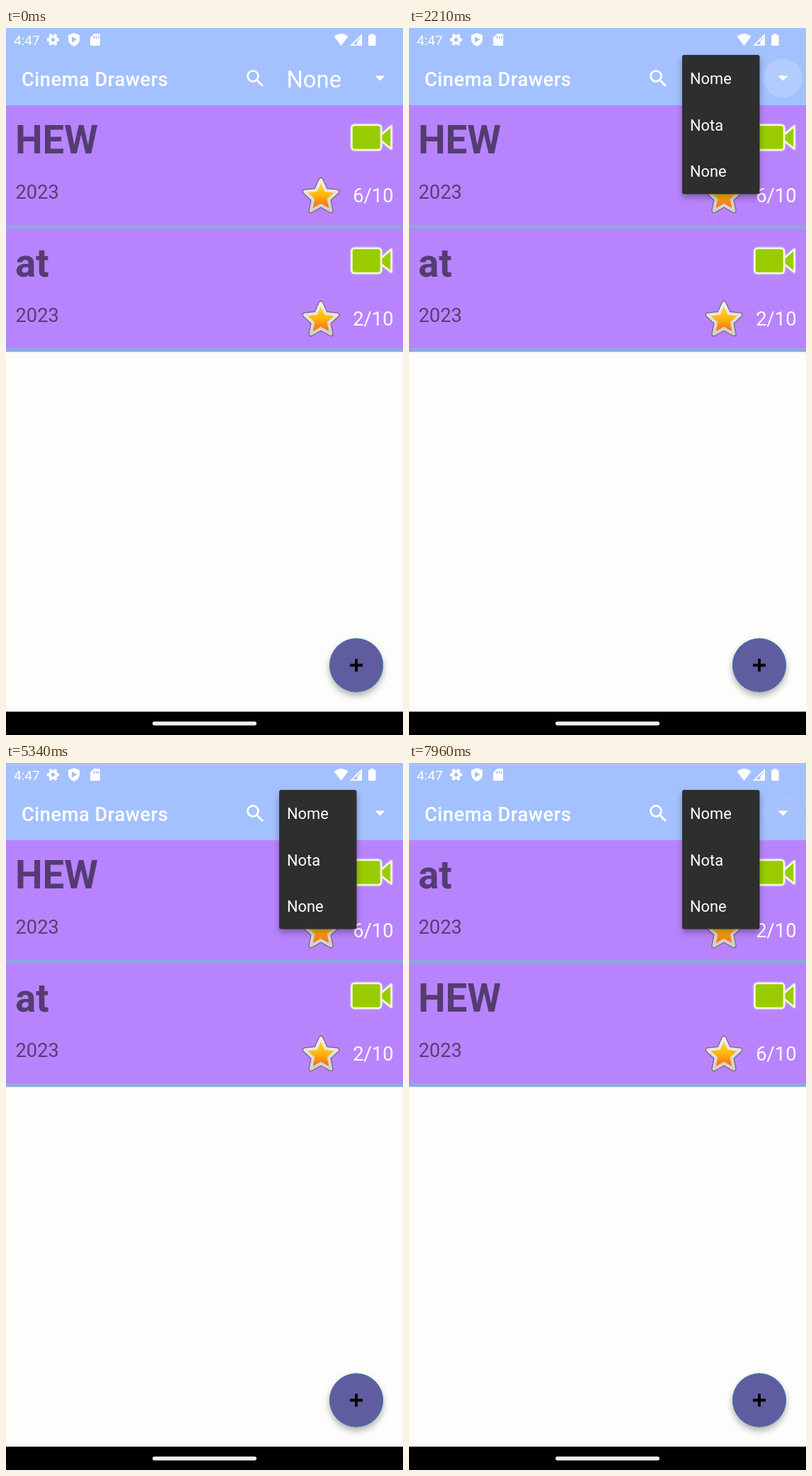
An HTML page that plays this animation: 561 by 998 pixels, repeating every 8000 ms.

```html
<!DOCTYPE html>
<html lang="en">
<head>
<meta charset="utf-8">
<title>Film list</title>
<style>
  html, body { margin: 0; width: 100%; height: 100%; overflow: hidden; background: #fdfdfb; }
  svg { display: block; width: 100%; height: 100%; }
  text { font-family: Roboto, sans-serif; font-size: 27.3px; fill: #fff; }
  .name { font-size: 54.6px; font-weight: 700; fill: #543c73; }
  .year { fill: #563e76; }
  .heading { font-weight: 500; letter-spacing: .5px; }
  .choice { font-size: 32.75px; }
  .clock { font-size: 19.1px; }
  #menu text { font-size: 21.84px; }
</style>
</head>
<body>
<svg viewBox="0 0 561 998">
  <defs>
    <linearGradient id="gold" x1="0" y1="0" x2="0" y2="1">
      <stop offset=".1" stop-color="#ffd21c"/>
      <stop offset=".5" stop-color="#ffb40c"/>
      <stop offset="1" stop-color="#fb6a14"/>
    </linearGradient>
    <linearGradient id="silver" x1="0" y1="0" x2="0" y2="1">
      <stop offset="0" stop-color="#f2f0ee"/>
      <stop offset="1" stop-color="#d2cdd4"/>
    </linearGradient>
    <filter id="shadow" x="-30%" y="-30%" width="160%" height="170%">
      <feDropShadow dx="0" dy="5" stdDeviation="5" flood-opacity=".3"/>
    </filter>
    <filter id="glow" x="-20%" y="-20%" width="140%" height="140%">
      <feDropShadow dx="0" dy="0" stdDeviation="1.2" flood-color="#fff" flood-opacity=".8"/>
    </filter>
    <g id="camera" stroke="#f1f8d8" stroke-width="2.6" stroke-linejoin="round" fill="#99cc00" filter="url(#glow)">
      <path d="M530 151L544.5 138.5V170.5L530 159Z"/>
      <rect x="488.5" y="137" width="41.5" height="35" rx="4"/>
    </g>
    <g id="star" stroke-linejoin="round">
      <path class="star" fill="#77656f" stroke="#77656f" stroke-width="7"/>
      <path class="star" fill="url(#silver)" stroke="url(#silver)" stroke-width="4.5"/>
      <path class="star" fill="url(#gold)" transform="scale(.8)"/>
    </g>
  </defs>

  <rect width="561" height="998" fill="#fdfdfb"/>
  <rect width="561" height="109" fill="#a3c1fe"/>

  <!-- status bar -->
  <text class="clock" x="11" y="24">4:47</text>
  <g fill="none" stroke="#fff">
    <circle cx="66.5" cy="16.5" r="4.7" stroke-width="3.8"/>
    <circle cx="66.5" cy="16.5" r="7.2" stroke-width="3" pathLength="60" stroke-dasharray="5" stroke-dashoffset="2.5"/>
  </g>
  <g fill="#fff">
    <path fill-rule="evenodd" d="M96 7L104 10V16Q104 22.5 96 26Q88 22.5 88 16V10ZM93 12V20.5L100.5 16.2Z"/>
    <path fill-rule="evenodd" d="M124.5 8H131.5Q133 8 133 9.5V23.5Q133 25 131.5 25H120.5Q119 25 119 23.5V13.5ZM123.5 11.5V15H125.2V11.5ZM126.7 11.5V15H128.4V11.5ZM129.9 11.5V15H131.6V11.5Z"/>
    <path d="M463.5 12Q473.5 4 483.5 12L473.5 25Z"/>
    <path fill-rule="evenodd" d="M503 8V25H486ZM501.3 12.2L490.2 23.3H496.5V18.5L501.3 13.7Z"/>
    <path d="M515 8H519.5V9.7H521Q522.5 9.7 522.5 11V23.7Q522.5 25 521 25H513.5Q512 25 512 23.7V11Q512 9.7 513.5 9.7H515Z"/>
  </g>

  <!-- app bar -->
  <text class="heading" x="22" y="81.5">Cinema Drawers</text>
  <path transform="translate(336 55) scale(1.365)" fill="#fff" d="M15.5 14h-.79l-.28-.27A6.47 6.47 0 0 0 16 9.5 6.5 6.5 0 1 0 9.5 16c1.61 0 3.09-.59 4.23-1.57l.27.28v.79l5 4.99L20.49 19l-4.99-5zm-6 0a4.5 4.5 0 1 1 0-9 4.5 4.5 0 0 1 0 9z"/>
  <text class="choice" id="choice" x="396.5" y="83.5">None</text>
  <circle id="ripple" cx="528.5" cy="71" r="27.5" fill="#fff"/>
  <path d="M521.5 67.5H535.5L528.5 74.5Z" fill="#fff"/>

  <g id="rows"></g>

  <!-- add button -->
  <circle cx="495" cy="899.5" r="37.7" fill="#5f5d9f" stroke="#3f78a8" stroke-width="1" filter="url(#shadow)"/>
  <path d="M495 890.5V908.5M486 899.5H504" stroke="#000" stroke-width="3.8"/>

  <rect y="965" width="561" height="33" fill="#000"/>
  <rect x="207" y="979" width="147" height="5.5" rx="2.75" fill="#f0f0f0"/>

  <g id="menu">
    <rect x="386" y="38" width="109.5" height="196.5" rx="3" fill="#2e2e2e" filter="url(#shadow)"/>
    <text x="397" y="79">Nome</text>
    <text x="397" y="144.7">Nota</text>
    <text x="397" y="210">None</text>
  </g>
</svg>
<script>
const LOOP = 8000;
const ROW_PITCH = 174;
const FADE_IN = 130, FADE_OUT = 200;
const menuTimes = [
  { open: 2000, close: 3250, pick: 'Nota' },
  { open: 4700, close: 5985, pick: 'Nome' },
  { open: 7480, close: Infinity }
];
const films = [{ name: 'HEW', score: 6 }, { name: 'at', score: 2 }];

const byId = id => document.getElementById(id);
const clamp = v => Math.max(0, Math.min(1, v));

const starPoints = Array.from({ length: 10 }, (_, i) => {
  const radius = i % 2 ? 11.5 : 24;
  const angle = i * Math.PI / 5;
  return `${radius * Math.sin(angle)} ${-radius * Math.cos(angle)}`;
});
document.querySelectorAll('.star').forEach(path => path.setAttribute('d', `M${starPoints.join('L')}Z`));

byId('rows').innerHTML = films.map(({ name, score }) => `
  <g>
    <rect y="109" width="561" height="174.3" fill="#90a8de"/>
    <rect y="109" width="561" height="169" fill="#b884fe"/>
    <text class="name" x="13" y="177">${name}</text>
    <text class="year" x="13.5" y="241">2023</text>
    <use href="#camera"/>
    <use href="#star" x="445" y="238.5"/>
    <text x="547.5" y="246" text-anchor="end">${score}/10</text>
  </g>`).join('');
const rows = [...byId('rows').children];

function draw(t) {
  let choice = 'None', menuAlpha = 0, rippleAlpha = 0, rippleSize = 0;
  for (const { open, close, pick } of menuTimes) {
    const age = t - open;
    if (t >= close) choice = pick;
    menuAlpha += Math.min(clamp(age / FADE_IN), clamp(1 - (t - close) / FADE_OUT));
    const press = clamp((age + 120) / 200);
    rippleAlpha += 0.17 * press * clamp((550 - age) / 300);
    if (press) rippleSize = press;
  }

  byId('choice').textContent = choice;
  byId('menu').setAttribute('opacity', menuAlpha);
  byId('ripple').setAttribute('opacity', rippleAlpha);
  byId('ripple').setAttribute('r', 27.5 * rippleSize);

  const sortedByName = choice === 'Nome';
  rows.forEach((row, i) => {
    const place = sortedByName ? 1 - i : i;
    row.setAttribute('transform', `translate(0 ${place * ROW_PITCH})`);
  });
}

const start = performance.now();
function tick() {
  draw((performance.now() - start) % LOOP);
  requestAnimationFrame(tick);
}
tick();
</script>
</body>
</html>
```
